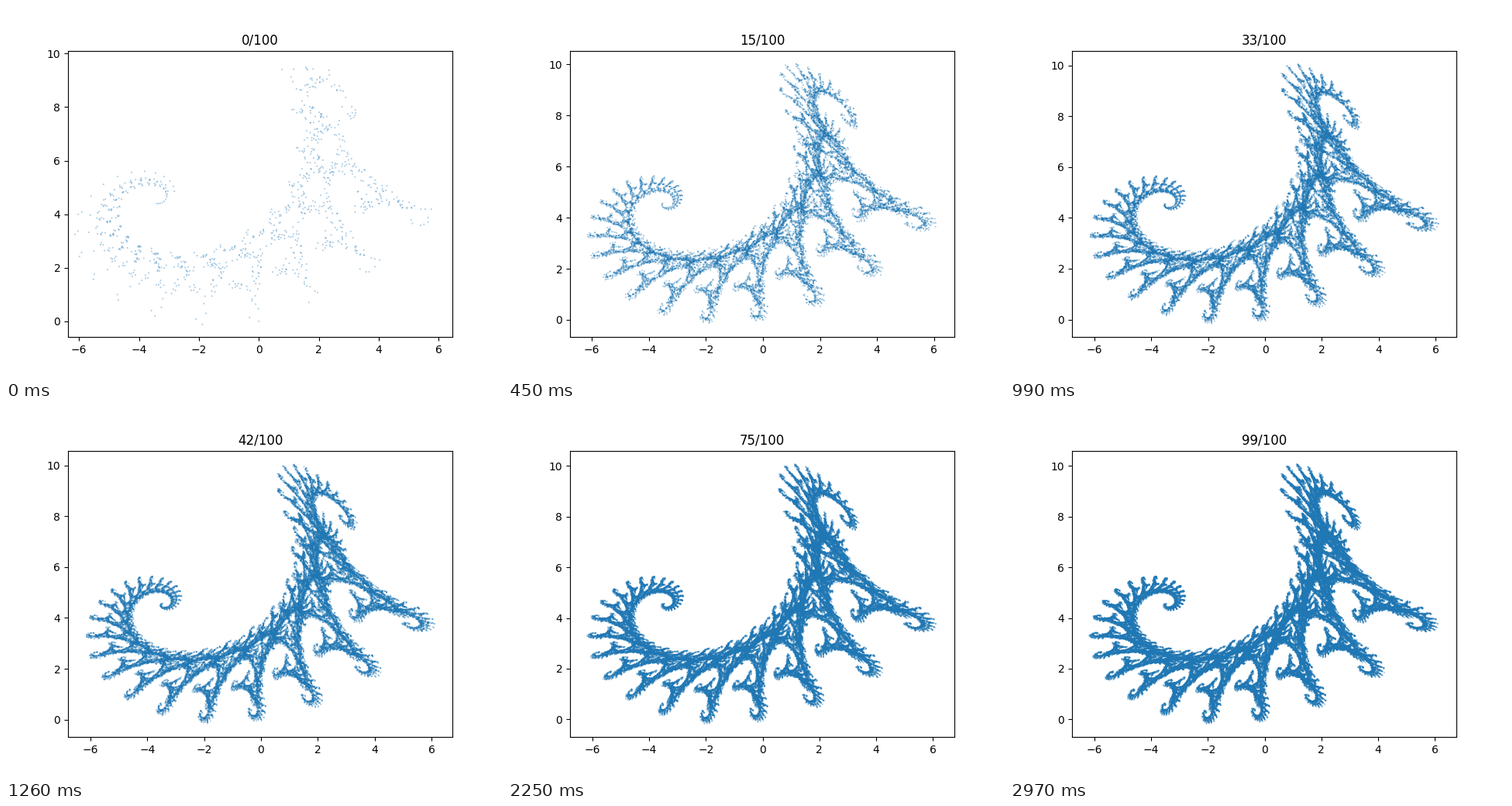
Recreate the animation shown at these times as a matplotlib script. Size 640x480 px, loop 3000 ms.

```python
import random

import matplotlib.pyplot as plt
import numpy as np
from matplotlib.animation import FuncAnimation

FRAMES = 100
STEP = 1000  # points added per frame

# x' = a x + b y + e,  y' = c x + d y + f
BODY = (0.824074, 0.281482, -0.212346, 0.864198, -1.882290, -0.110607)
LIMB = (0.088272, 0.520988, -0.463889, -0.377778, 0.785360, 8.095795)
P_BODY = 0.787473

# View limits at a few moments of growth
KEYS = np.log1p([0, 6, 25, 42, 75, 99])
X_MIN = [-6.367, -6.711, -6.787, -6.787, -6.787, -6.787]
X_MAX = [6.460, 6.685, 6.727, 6.735, 6.757, 6.757]
Y_MIN = [-0.589, -0.655, -0.685, -0.693, -0.695, -0.695]
Y_MAX = [10.1095, 10.491, 10.560, 10.592, 10.598, 10.598]


def orbit(count, seed=3):
    rng = random.Random(seed)
    x = y = 0.0
    points = []
    for _ in range(count):
        points.append((x, y))
        a, b, c, d, e, f = BODY if rng.random() < P_BODY else LIMB
        x, y = a * x + b * y + e, c * x + d * y + f
    return np.array(points)


def limit(values, i):
    return np.interp(np.log1p(i), KEYS, values)


points = orbit(FRAMES * STEP)

fig, ax = plt.subplots(figsize=(6.4, 4.8), dpi=100)
# Fine open rings: each leaves a pale tint that builds up with overlap
dots = ax.scatter([], [], s=1, facecolors="none", edgecolors="tab:blue",
                  linewidths=0.2)
title = ax.set_title("")


def update(i):
    dots.set_offsets(points[:(i + 1) * STEP])
    ax.set_xlim(limit(X_MIN, i), limit(X_MAX, i))
    ax.set_ylim(limit(Y_MIN, i), limit(Y_MAX, i))
    title.set_text(f"{i}/{FRAMES}")
    return dots, title


anim = FuncAnimation(fig, update, frames=FRAMES, interval=30,
                     init_func=lambda: update(0), repeat=True, repeat_delay=0)
plt.show()
```
